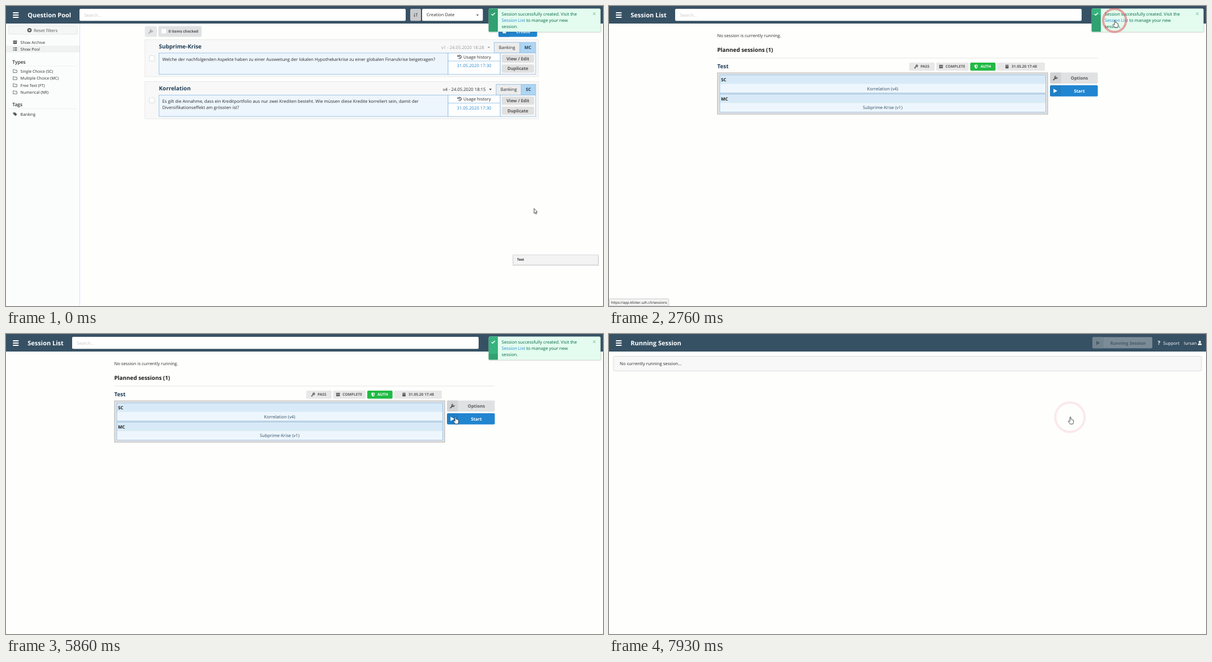
An HTML page that plays this animation: 1056 px wide and 530 px high, repeating every 8000 ms.

```html
<!DOCTYPE html>
<html lang="en">
<head>
<meta charset="utf-8">
<title>Session start</title>
<style>
html, body { margin: 0; width: 100%; height: 100%; overflow: hidden; background: #fefefd; }
svg { display: block; width: 1056px; height: 530px; font-family: "Open Sans", "Noto Sans", sans-serif; }
text { white-space: pre; text-rendering: geometricPrecision; }
</style>
</head>
<body>
<svg id="stage" viewBox="0 0 1056 530" xmlns="http://www.w3.org/2000/svg"></svg>
<script>
const LOOP = 8000;
const INK = '#2b2b2b', NAVY = '#1f3e56', BLUE = '#2185d0', EDGE = '#8dbbe0', GREY = '#555';

// Drawing helpers; text is placed by the middle of its capitals.
const rect = (x, y, x2, y2, fill, extra = '') =>
  `<rect x="${x}" y="${y}" width="${x2 - x}" height="${y2 - y}" fill="${fill}" ${extra}/>`;
const box = (x, y, x2, y2, fill, stroke, extra = '') =>
  rect(x, y, x2, y2, fill, `stroke="${stroke}" stroke-width=".8" ${extra}`);
const text = (x, y, str, { size = 7.7, fill = INK, bold, weight = bold ? 700 : 400, mid } = {}) =>
  `<text x="${x}" y="${y + size * 0.36}" font-size="${size}" fill="${fill}" font-weight="${weight}"` +
  `${mid ? ' text-anchor="middle"' : ''}>${str}</text>`;
const line = (d, stroke, width = 0.8, extra = '') =>
  `<path d="${d}" fill="none" stroke="${stroke}" stroke-width="${width}" ${extra}/>`;
const group = (id, content) => `<g id="${id}">${content}</g>`;

// Icons are drawn around their own centre.
const icons = {
  wrench: c => line('M-3.2 3.2L1 -1', c, 1.8, 'stroke-linecap="round"') +
    line('M3.3 -1.5A2.2 2.2 0 1 1 1.2 -3.4', c, 1.5),
  play: c => `<path d="M-3 -3.7L3.6 0L-3 3.7Z" fill="${c}"/>`,
  caret: c => `<path d="M-2.3 -1.1H2.3L0 1.5Z" fill="${c}"/>`,
  folder: c => line('M-3.3 -2.7H-1L0 -1.7H3.3V2.7H-3.3Z', c, 0.8, 'stroke-linejoin="round"'),
  archive: c => rect(-3.5, -3, 3.5, -1.3, c) +
    `<path d="M-3.1 -.8H3.1V3H-3.1ZM-1.2 0V.7H1.2V0Z" fill="${c}" fill-rule="evenodd"/>`,
  list: c => line('M-3.5 -2.4H-2M-1.2 -2.4H3.5M-3.5 0H-2M-1.2 0H3.5M-3.5 2.4H-2M-1.2 2.4H3.5', c, 1.2),
  tag: c => `<path d="M-3.5 -3H0L3.6 .4L.8 3.3L-3.5 -.6ZM-2.3 -2.2V-1.2H-1.3V-2.2Z" fill="${c}" fill-rule="evenodd"/>`,
  reset: c => `<circle r="3.8" fill="${c}"/>` + line('M-1.4 -1.4L1.4 1.4M1.4 -1.4L-1.4 1.4', '#eee', 1.1),
  history: c => line('M-2.6 -1.8A3.1 3.1 0 1 1 -2.2 2.2M0 -1.7V.3L1.4 1.2', c, 1) +
    `<path d="M-3.9 -3.4V-.5H-1Z" fill="${c}"/>`,
  key: c => `<circle cx="1.4" cy="-1.3" r="1.5" fill="none" stroke="${c}" stroke-width="1.4"/>` +
    line('M.2 0L-3 3M-2 2L-.8 3', c, 1.3),
  shield: c => `<path d="M0 -3.6L3 -2.5C3 .8 2 2.8 0 3.7C-2 2.8 -3 .8 -3 -2.5Z" fill="${c}"/>` +
    '<path d="M.2 -2.4L1.9 -1.7C1.8 .5 1.3 1.7 .2 2.4Z" fill="#21ba45"/>',
  calendar: c => rect(-2.8, -2.8, 2.8, 3.2, c, 'rx=".6"') +
    line('M-1.4 -3.6V-2M1.4 -3.6V-2', c, 1) + line('M-2.8 -1H2.8', '#e8e8e8', 0.6),
  menu: c => line('M-5 -4H5M-5 0H5M-5 4H5', c, 1.8),
  user: c => `<circle cy="-1.8" r="2" fill="${c}"/><path d="M-3.3 3.8V2.3Q-3.3 .7 -1.4 .7H1.4Q3.3 .7 3.3 2.3V3.8Z" fill="${c}"/>`,
  sort: c => line('M-1.9 -3V3M-3.2 1.5L-1.9 3L-.6 1.5M1.9 3V-3M.6 -1.5L1.9 -3L3.2 -1.5', c, 0.9),
  check: c => line('M-3 .2L-.9 2.2L3.2 -2', c, 1.5),
  cross: c => line('M-2.3 -2.3L2.3 2.3M2.3 -2.3L-2.3 2.3', c, 0.9),
};
const icon = (name, x, y, color = GREY) => `<g transform="translate(${x} ${y})">${icons[name](color)}</g>`;

const header = (title, searchFrom, searchTo) =>
  rect(0, 0, 1056, 31, '#375164') +
  icon('menu', 17.3, 16, '#fff') + text(38.3, 15.8, title, { size: 11, fill: '#fff', bold: true }) +
  (searchFrom ? rect(searchFrom, 5, searchTo, 26.3, '#fff', 'rx="2"') +
    text(searchFrom + 8.5, 16, 'Search...', { fill: '#c4c4c4' }) : '');

const account = () =>
  rect(855, 5.5, 961, 25.3, '#7b8b97', 'rx="2"') + rect(855, 5.5, 875, 25.3, '#73848f', 'rx="2"') +
  icon('play', 865, 15.7, '#4a5d6b') +
  text(918, 15.8, 'Running Session', { fill: '#485a67', bold: true, mid: true }) +
  text(970.5, 15.8, '?', { size: 9.5, fill: '#fff', bold: true }) +
  text(980.3, 15.8, 'Support', { fill: '#fff' }) +
  text(1017, 15.8, 'lursan', { fill: '#fff' }) + icon('user', 1045, 15.8, '#fff');

const question = (dy, { title, version, faded, versionX, tagX, kindX, kind, lines }) => {
  const ink = faded ? '#999' : INK;
  const button = (y, label) => rect(877, y, 934, y + 14.2, '#e0e0e0', 'rx="2"') +
    text(905.5, y + 7.1, label, { fill: GREY, bold: true, mid: true });
  return `<g transform="translate(0 ${dy})">` +
    box(245.8, 59.3, 941.4, 125, '#f8f8f8', '#e3e4e5') +
    box(253.7, 87.8, 262.8, 97, '#fff', '#d4d4d5', 'rx="1.2"') +
    text(270.5, 71.4, title, { size: 9.9, fill: NAVY, bold: true }) +
    text(versionX, 72.8, version, { fill: ink }) + icon('caret', versionX + 84, 73, ink) +
    box(tagX, 64.2, kindX, 83, '#ececec', EDGE) + box(kindX, 64.2, 937, 83, '#aed5f2', EDGE) +
    text((tagX + kindX) / 2, 73, 'Banking', { mid: true }) +
    text((kindX + 937) / 2, 73, kind, { fill: NAVY, bold: true, mid: true }) +
    box(270.7, 83, 782, 120.8, '#edf5fd', EDGE) +
    box(782, 83, 874.2, 120.8, '#fff', EDGE) + box(874.2, 83, 937, 120.8, '#f8f8f8', EDGE) +
    line('M782 97.2H874.2', EDGE) +
    icon('history', 802.5, 90, INK) + text(809, 90, 'Usage history') +
    text(828, 105.7, '31.05.2020 17:30', { fill: BLUE, mid: true }) +
    button(85.8, 'View / Edit') + button(103.6, 'Duplicate') +
    lines.map((str, i) => text(276.5, 94 + i * 11, str)).join('') + '</g>';
};

const poolPage = () => {
  const filters = ['Single Choice (SC)', 'Multiple Choice (MC)', 'Free Text (FT)', 'Numerical (NR)'];
  const entry = (name, y, label) => icon(name, 16, y) + text(25.6, y, label, { size: 7.04 });
  const heading = (y, label) => text(11.3, y, label, { size: 8.47, fill: '#333', weight: 600 }) +
    line(`M4 ${y + 7.5}H126`, '#e6e9eb', 0.6);
  return header('Question Pool', 130, 707) +
    rect(715, 5, 734, 26.3, '#cacbcd', 'rx="2"') + icon('sort', 724.5, 15.7) +
    rect(736, 5, 843.5, 26.3, '#fff', 'rx="2"') + text(744, 15.7, 'Creation Date') + icon('caret', 834, 16) +
    rect(0, 31, 130, 528.5, '#fbfdfd') + line('M130.5 31V528.5', '#c4dcee') +
    box(4.3, 35.3, 126.3, 50, '#f4f5f5', '#e1e2e3', 'rx="2"') +
    icon('reset', 41.5, 42.8) + text(49, 42.8, 'Reset filters', { fill: GREY }) +
    rect(0, 70, 130, 82, '#f0f1f1') +
    entry('archive', 64, 'Show Archive') + entry('list', 76, 'Show Pool') +
    heading(98.6, 'Types') + filters.map((label, i) => entry('folder', 115 + i * 12.5, label)).join('') +
    heading(174, 'Tags') + entry('tag', 191, 'Banking') +
    rect(245.5, 35.5, 267, 54.5, '#e6e7e8', 'rx="2"') + icon('wrench', 256, 45, '#aaa') +
    rect(269.5, 35.5, 346, 54.5, '#e0e1e2', 'rx="2"') + box(274.5, 40, 283.5, 49, '#fff', '#ddd', 'rx="1.2"') +
    text(287.5, 45, '0 items checked', { size: 6.6, fill: GREY, bold: true }) +
    rect(871, 35, 939.5, 54.6, BLUE, 'rx="2"') + rect(871, 35, 891, 54.6, '#1f7ec5', 'rx="2"') +
    rect(878.5, 42, 884.5, 48.2, '#fff') + text(915, 45, 'Create', { fill: '#fff', bold: true, mid: true }) +
    question(0, { title: 'Subprime-Krise', version: 'v1 - 24.05.2020 18:28', faded: true,
      versionX: 770, tagX: 863.5, kindX: 909, kind: 'MC',
      lines: ['Welche der nachfolgenden Aspekte haben zu einer Ausweitung der lokalen Hypothekarkrise zu einer globalen Finanzkrise beigetragen?'] }) +
    question(74.3, { title: 'Korrelation', version: 'v4 - 24.05.2020 18:15',
      versionX: 772.8, tagX: 867, kindX: 911.3, kind: 'SC',
      lines: ['Es gilt die Annahme, dass ein Kreditportfolio aus nur zwei Krediten besteht. Wie müssen diese Kredite korreliert sein, damit der',
        'Diversifikationseffekt am grössten ist?'] }) +
    rect(896, 440, 1049, 459, '#000', 'opacity=".1" rx="1"') +
    box(897, 439.8, 1047.3, 457.2, '#f3f3f3', '#cfcfcf', 'id="planned"') +
    text(904, 448, 'Test', { size: 6.16, bold: true });
};

const listPage = () => {
  const chip = (x, x2, name, label, labelX, fill = '#e8e8e8', color = '#5a5a5a') =>
    rect(x, 100, x2, 114.3, fill, 'rx="2"') + icon(name, labelX - 8, 107, color) +
    text(labelX, 107, label, { size: 6.6, fill: color, bold: true });
  const block = (y, kind, label) => rect(196, y, 772.6, y + 15.8, '#d8eaf7') +
    rect(196, y + 15.8, 772.6, y + 32, '#eef6fd') + box(196, y, 772.6, y + 32, 'none', EDGE) +
    text(198.3, y + 8.4, kind, { fill: '#1b1b1b', bold: true }) +
    text(484, y + 24, label, { fill: '#2f4d63', mid: true });
  return header('Session List', 117, 836) + account() +
    text(191.4, 52, 'No session is currently running.') +
    text(191.4, 77.6, 'Planned sessions (1)', { size: 9.9, fill: '#1b1b1b', bold: true }) +
    line('M191.5 92H864.5', '#dedede') +
    text(191.4, 106.3, 'Test', { size: 9.9, fill: NAVY, bold: true }) +
    chip(531, 576, 'key', 'PASS', 551) + chip(578.8, 636, 'archive', 'COMPLETE', 595.3) +
    chip(639, 683.7, 'shield', 'AUTH', 657.3, '#21ba45', '#fff') +
    chip(686.5, 771, 'calendar', '31.05.20 17:48', 712) +
    rect(192, 118.2, 776, 191, '#e4e4e4', 'stroke="#b9b9b9" stroke-width="1.2"') +
    block(121.8, 'SC', 'Korrelation (v4)') + block(155.5, 'MC', 'Subprime-Krise (v1)') +
    rect(780, 117.5, 864.6, 137, '#e0e1e2', 'rx="2"') + rect(780, 117.5, 799.5, 137, '#d2d3d4', 'rx="2"') +
    icon('wrench', 789.5, 127.3) + text(832, 127.4, 'Options', { fill: '#5a5a5a', bold: true, mid: true }) +
    rect(780, 140, 864.6, 159.7, BLUE, 'id="start" rx="2"') +
    rect(780, 140, 799.5, 159.7, '#000', 'opacity=".05" rx="2"') +
    icon('play', 789.3, 150, '#fff') + text(832, 150, 'Start', { fill: '#fff', bold: true, mid: true });
};

const runPage = () => header('Running Session') + account() +
  box(8, 39.4, 1048, 65.3, '#f8f8f8', '#d2d3d4', 'rx="2"') +
  text(19, 52.2, 'No currently running session...');

const toastCard = () =>
  rect(852.5, 5.5, 1053.5, 48, '#000', 'opacity=".05" rx="4"') +
  rect(853.2, 5, 1052.6, 46.6, '#000', 'opacity=".1" rx="3"') +
  rect(853.7, 4.5, 1051.7, 45.5, '#e3fcef', 'rx="2.2"') +
  `<path d="M870 4.5H855.9Q853.7 4.5 853.7 6.7V43.3Q853.7 45.5 855.9 45.5H870Z" fill="#36b37e"/>` +
  rect(853.7, 4.5, 870, 45.5, '#000', 'id="countdown" opacity=".1"') +
  icon('check', 861.7, 14, '#fff') +
  text(876.7, 14.4, 'Session successfully created. Visit the', { fill: '#006644' }) +
  text(876.7, 25.1, `<tspan fill="${BLUE}">Session List</tspan> to manage your new`, { fill: '#006644' }) +
  text(876.7, 35.8, 'session.', { fill: '#006644' }) + icon('cross', 1040.5, 13.7, '#6bab91');

const statusBar = () => box(.4, 517.4, 105.6, 530, '#f4f4f4', '#bdbdbd', 'rx="1.5"') +
  text(3.8, 524, 'https://app.klicker.uzh.ch/sessions', { size: 6.16, fill: '#222' });

const pointer = d => `<path d="${d}" fill="#fff" stroke="#222" stroke-width=".8" stroke-linejoin="round"/>`;
const ARROW = 'M0 0V8.6L1.9 6.9L3.2 9.9L4.6 9.3L3.4 6.3H6Z';
const HAND = 'M-1.1 1Q-1.1 0 -.2 0Q.8 0 .8 1V4.2Q2.2 3.7 2.5 4.7Q3.8 4.3 4 5.4Q5.2 5.1 5.2 6.4V9Q5.2 11 4 12.6H-.6Q-1.6 10.9 -3.8 8.3Q-4.2 7 -3 6.9Q-2.1 6.9 -1.1 8Z';

document.getElementById('stage').innerHTML =
  group('pool', poolPage()) + group('list', listPage()) + group('run', runPage()) +
  group('toast', toastCard()) + group('status', statusBar()) +
  '<circle id="ring" fill="none" stroke="#e0303c"/>' +
  group('cursor', group('arrow', pointer(ARROW)) + group('hand', pointer(HAND)));

const el = Object.fromEntries([...document.querySelectorAll('[id]')].map(node => [node.id, node]));
const set = (node, attrs) => Object.entries(attrs).forEach(([key, value]) => node.setAttribute(key, value));
const show = (node, on) => set(node, { display: on ? 'inline' : 'none' });
const progress = (t, from, to) => Math.min(1, Math.max(0, (t - from) / (to - from)));
const smooth = p => p * p * (3 - 2 * p);
const mix = (a, b, p) => `rgb(${a.map((v, i) => Math.round(v + (b[i] - v) * p))})`;

const LINK_AT = 1370, LINK_LEFT = 3540, START_AT = 5790;
const LIST_AT = 2400, RUN_AT = 7760, DISMISS_AT = 7150;
const HOVER_FROM = 1290; // the toast's countdown waits while the pointer rests on it
const RING_LIFE = 1210;
const clicks = [{ at: 1890, x: 894.3, y: 25.5 }, { at: 6797, x: 815.3, y: 147 }];

// Pointer stops: time, x, y
const route = [
  [0, 934, 357.7], [250, 934, 357.7], [820, 914, 140], [1180, 901, 52], [1380, 895.3, 25.3],
  [3490, 895.3, 25.3], [3630, 831, 60.8], [4160, 776, 86], [4300, 776, 86], [5080, 732, 122],
  [5260, 725, 124.5], [5430, 725, 124.5], [5850, 795.3, 146.3], [6260, 788, 147.5], [6700, 816.3, 146.5],
  [8000, 816.3, 146.5],
];

function pointerAt(t) {
  const i = route.findIndex(stop => stop[0] > t);
  const [t0, x0, y0] = route[i - 1], [t1, x1, y1] = route[i];
  const p = smooth(progress(t, t0, t1));
  return [x0 + (x1 - x0) * p, y0 + (y1 - y0) * p];
}

function drawToast(t) {
  const elapsed = t < HOVER_FROM ? t + 100 : Math.max(HOVER_FROM + 100, t - 2150);
  const used = 41 * Math.min(1, elapsed / 5000);
  set(el.countdown, { y: 4.5 + used, height: 41 - used });
  const leave = progress(t, DISMISS_AT, DISMISS_AT + 220);
  const scale = 1 - 0.34 * (1 - (1 - leave) ** 3);
  set(el.toast, { opacity: 1 - leave, transform: `translate(952.7 25) scale(${scale}) translate(-952.7 -25)` });
  show(el.toast, leave < 1);
}

function drawRing(t) {
  const click = clicks.find(c => t >= c.at && t < c.at + RING_LIFE);
  show(el.ring, click);
  if (!click) return;
  const age = t - click.at;
  set(el.ring, {
    cx: click.x, cy: click.y, r: 1.5 + age * 0.0215,
    'stroke-width': Math.min(4, 2 + age / 100),
    opacity: Math.min(0.9, (RING_LIFE - age) * 0.00128),
  });
}

function draw(t) {
  show(el.pool, t < LIST_AT);
  show(el.list, t >= LIST_AT && t < RUN_AT);
  show(el.run, t >= RUN_AT);
  set(el.planned, { fill: mix([243, 243, 243], [232, 242, 250], progress(t, 30, 250)) });
  set(el.start, { fill: t < 6800 ? mix([33, 133, 208], [22, 120, 194], progress(t, 5860, 5960)) : '#0d71bb' });
  drawToast(t);
  show(el.status, t >= LINK_AT && t < 3780);
  set(el.status, { opacity: 1 - progress(t, LINK_LEFT, 3700) });
  drawRing(t);
  const onTarget = (t >= LINK_AT && t < LINK_LEFT) || t >= START_AT;
  show(el.arrow, !onTarget);
  show(el.hand, onTarget);
  set(el.cursor, { transform: `translate(${pointerAt(t)})` });
}

const begin = performance.now();
function tick() {
  draw((performance.now() - begin) % LOOP);
  requestAnimationFrame(tick);
}
tick();
</script>
</body>
</html>
```
